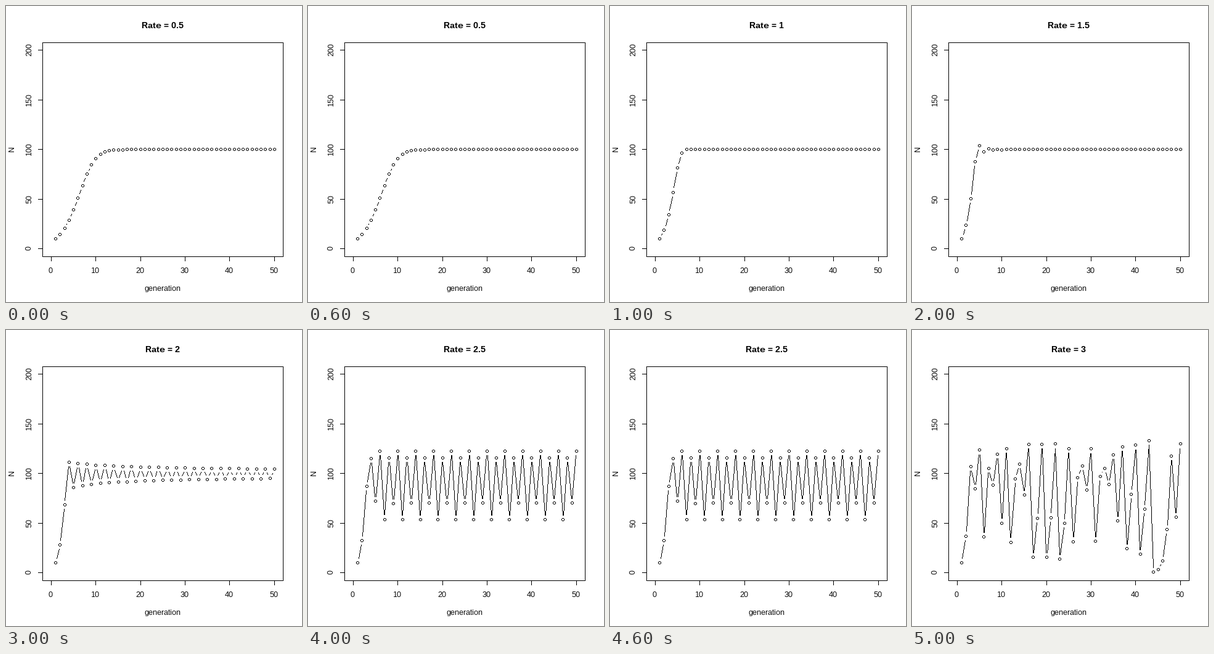
These frames come from a looping animation (480 px wide and 480 px high, 6000 ms). A matplotlib script:

```python
import numpy as np
import matplotlib.pyplot as plt
from matplotlib.animation import FuncAnimation

plt.rcParams.update({
    "font.family": "Liberation Sans",
    "font.size": 12,
    "text.hinting": "native",
    "text.hinting_factor": 1,
    "toolbar": "None",
})

SIZE = 480
LINE = 14.4                       # height of one margin line
LEFT, RIGHT = 59.04, 449.76
TOP, BOTTOM = 59.04, 406.56
MID_X, MID_Y = (LEFT + RIGHT) / 2 - 0.5, (TOP + BOTTOM) / 2 - 1

RATES = [0.5, 1, 1.5, 2, 2.5, 3]
GENERATIONS = np.arange(1, 51)
CAPACITY = 100
START = 10
GAP = LINE / 2                    # space between a marker and its line
TICK = 7


def to_x(g):
    return LEFT + (g + 2) / 54 * (RIGHT - LEFT)


def to_y(n):
    return BOTTOM - (n + 8) / 216 * (BOTTOM - TOP)


def logistic(rate):
    sizes = [float(START)]
    while len(sizes) < len(GENERATIONS):
        n = sizes[-1]
        sizes.append(n + rate * n * (1 - n / CAPACITY))
    return np.array(sizes)


def draw_line(canvas, a, b):
    """Crisp line, one pixel wide, with both ends included."""
    a, b = np.floor(a), np.floor(b)
    steps = int(np.abs(b - a).max())
    x, y = np.floor(np.linspace(a, b, steps + 1) + 0.5).astype(int).T
    canvas[y, x] = 0


def draw_ring(canvas, point):
    """Round marker, five pixels wide."""
    x, y = np.floor(point).astype(int)
    for d in (-2, 2):
        canvas[y + d, x - 1:x + 2] = 0
        canvas[y - 1:y + 2, x + d] = 0


def draw_curve(canvas, points):
    for a, b in zip(points[:-1], points[1:]):
        length = np.hypot(*(b - a))
        if length > 2 * GAP:
            cut = (b - a) * GAP / length
            draw_line(canvas, a + cut, b - cut)
    for point in points:
        draw_ring(canvas, point)


fig = plt.figure(figsize=(SIZE / 72, SIZE / 72), dpi=72, facecolor="white")


def label(x, y, text, angle=0, **style):
    return fig.text(x / SIZE, 1 - y / SIZE, text, ha="center", va="baseline",
                    rotation=angle, rotation_mode="anchor", color="black",
                    **style)


def draw_axes(canvas):
    corners = [(LEFT, TOP), (RIGHT, TOP), (RIGHT, BOTTOM), (LEFT, BOTTOM)]
    for a, b in zip(corners, corners[1:] + corners[:1]):
        draw_line(canvas, a, b)
    for g in range(0, 51, 10):
        x = to_x(g)
        draw_line(canvas, (x, BOTTOM), (x, BOTTOM + TICK))
        label(np.floor(x) - 0.5, 433, str(g))
    for n in range(0, 201, 50):
        y = to_y(n)
        draw_line(canvas, (LEFT, y), (LEFT - TICK, y))
        label(41, np.floor(y) - 0.5, str(n), 90)
    label(MID_X, 462, "generation")
    label(13, MID_Y, "N", 90)


paper = np.ones((SIZE, SIZE))
draw_axes(paper)
picture = fig.figimage(paper, cmap="gray", vmin=0, vmax=1, origin="upper")
title = label(MID_X + 0.5, 36, "", fontsize=14, fontweight="bold")


def update(i):
    rate = RATES[i]
    canvas = paper.copy()
    points = np.column_stack([to_x(GENERATIONS), to_y(logistic(rate))])
    draw_curve(canvas, points)
    picture.set_data(canvas)
    title.set_text(f"Rate = {rate:g}")
    return picture, title


anim = FuncAnimation(fig, update, frames=len(RATES), interval=1000,
                     repeat=True, repeat_delay=0, blit=False)
plt.show()
```
